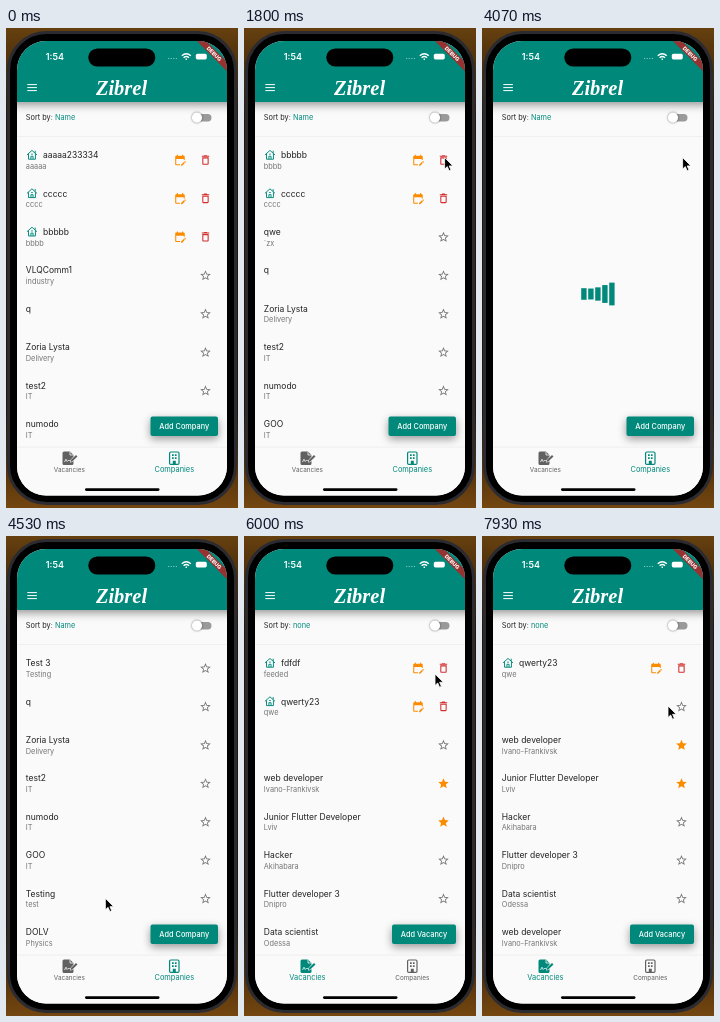
Animation of 232 by 480 pixels, one loop 8000 ms. Source, as an HTML page:

```html
<!DOCTYPE html>
<html lang="en">
<head>
<meta charset="utf-8">
<style>
html, body { margin: 0; width: 232px; height: 480px; overflow: hidden; background: #2b1a08 }
svg { display: block; font: 8.5px Inter, sans-serif }
.small { font-size: 7.35px }
.sub { font-size: 7.35px; fill: #757575 }
.teal { fill: #00897b }
.mid { text-anchor: middle }
.shadow { filter: drop-shadow(0 3px 4px #0006) }
.tab { color: #616161; font-size: 6.4px }
.tab.on { color: #00897b; font-size: 7.45px }
</style>
</head>
<body>
<svg width="232" height="480" viewBox="0 0 232 480">
  <defs>
    <linearGradient id="wall" x2="0" y2="1">
      <stop stop-color="#66400f"/><stop offset=".2" stop-color="#241507"/>
      <stop offset=".8" stop-color="#241507"/><stop offset="1" stop-color="#744610"/>
    </linearGradient>
    <clipPath id="screen"><rect x="11" y="13" width="210" height="454.5" rx="29"/></clipPath>
    <g id="home" fill="none" stroke="currentColor" stroke-width="1.8">
      <path d="M2.5 12.5 12 4l9.5 8.5M5.500 10.500V20.500h13V10.500M18 9V4.500M10 20.500V15h4v5.500M10.500 11h3"/>
    </g>
    <path id="edit" fill="currentColor" d="M12 22H5c-1.1 0-2-.9-2-2V6c0-1.1.9-2 2-2h1V2h2v2h8V2h2v2h1c1.1 0 2 .9 2 2v6h-2v-2H5v10h7zM22.1 17l.7-.7c.4-.4.4-1 0-1.4l-.7-.7c-.4-.4-1-.4-1.4 0l-.7.7zM21.4 17.7 16.1 23H14v-2.1l5.3-5.3z"/>
    <path id="trash" fill="currentColor" fill-rule="evenodd" d="M6 19c0 1.1.9 2 2 2h8c1.1 0 2-.9 2-2V7H6zM8 9h8v10H8zM15.5 4l-1-1h-5l-1 1H5v2h14V4z"/>
    <path id="star" fill="currentColor" d="M12 17.3 18.2 21l-1.7-7L22 9.2l-7.2-.6L12 2 9.2 8.6 2 9.2 7.5 14l-1.7 7z"/>
    <path id="hollow" fill="currentColor" fill-rule="evenodd" d="M12 17.3 18.2 21l-1.7-7L22 9.2l-7.2-.6L12 2 9.2 8.6 2 9.2 7.5 14l-1.7 7zM12 15.4l-3.8 2.3 1-4.3-3.3-2.9 4.4-.4L12 6.1l1.7 4 4.4.4-3.3 2.9 1 4.3z"/>
  </defs>

  <rect width="232" height="480" fill="url(#wall)"/>
  <rect x="2.5" y="4.5" width="227" height="471" rx="38" stroke="#2b2b30" stroke-width="3"/>
  <g clip-path="url(#screen)">
    <rect width="232" height="480" fill="#fafafa"/>
    <path d="M11 108.5h210" stroke="#f0f0f0"/>

    <g id="list"></g>
    <g id="loader" class="teal"></g>

    <g class="shadow"><rect id="fab" class="teal" y="388.4" height="19.6" rx="2"/></g>
    <text id="fabText" class="small mid" y="401" fill="#fff" font-weight="500"></text>

    <rect y="419" width="232" height="61" fill="#fafafa"/>
    <path d="M11 419h210" stroke="#eee"/>
    <g id="vacancies" class="tab" fill="currentColor">
      <path d="M58 423.5h6l3.5 3.5v1.5l-3.5 4v2l2.5-.4 1-1v2.4q0 1.5-1.5 1.5h-8q-1.5 0-1.5-1.5V425q0-1.5 1.5-1.5zM70 427l1.5 1.5-5.2 5-1.8.4.4-1.8z"/>
      <path d="M58.5 434l1.5-2.8 1.2 2.3 1-1h1.6M64 423.5v3.5h3.5" fill="none" stroke="#fafafa" stroke-width=".8"/>
      <text class="mid" x="63.4" y="443.8">Vacancies</text>
    </g>
    <g id="companies" class="tab" fill="currentColor">
      <rect x="163.6" y="424" width="9.4" height="12.4" rx="1.2" fill="none" stroke="currentColor" stroke-width="1.2"/>
      <path d="M166 426.3h1.7v1.7h-1.7zm2.9 0h1.7v1.7h-1.7zM166 429.3h1.7v1.7h-1.7zm2.9 0h1.7v1.7h-1.7zM166.8 436.5v-3.7h3v3.7z"/>
      <text class="mid" x="168.3" y="443.8">Companies</text>
    </g>
    <rect x="79" y="460.3" width="74.5" height="2.6" rx="1.3"/>

    <rect class="teal shadow" width="232" height="74"/>
    <text class="small" x="19.8" y="92.2" fill="#222">Sort by: <tspan id="sort" class="teal"></tspan></text>
    <rect x="187.5" y="86" width="18" height="7.4" rx="3.7" fill="#9a9a9a"/>
    <circle cx="191" cy="89.6" r="5.1" fill="#fff" style="filter:drop-shadow(0 .6px .8px #0008)"/>

    <text x="39.8" y="31.8" font-size="9" font-weight="600" fill="#fff">1:54</text>
    <rect x="82.3" y="20.4" width="67" height="18.2" rx="9.1"/>
    <path d="M162 30.5h9" stroke="#7fc4bd" stroke-width="1.2" stroke-dasharray="1.2 1.4"/>
    <g fill="none" stroke="#fff" stroke-width="1.4">
      <path d="M175.8 27.7q4.5-4 9 0M177.6 29.7q2.7-2.4 5.4 0M179.6 31.2h1.400"/>
      <path d="M21.3 56.6h9.6m-9.6 3h9.6m-9.6 3h9.6" stroke-width="1"/>
    </g>
    <rect x="189.8" y="25.8" width="11" height="5.6" rx="1.6" fill="#fff"/>
    <text class="mid" x="115.5" y="67" fill="#fff" style="font:italic bold 20.5px 'Liberation Serif',serif">Zibrel</text>
    <g transform="translate(208.2 25.8) rotate(45)">
      <rect x="-22" y="-3.2" width="44" height="6.4" fill="#983230"/>
      <text class="mid" y="1.9" font-size="5.3" font-weight="800" fill="#fff">DEBUG</text>
    </g>
  </g>
  <path id="cursor" d="M0 0v11.5l2.7-2.5 1.8 4.2 1.9-.8-1.8-4.1h3.7z" stroke="#fff" stroke-width=".8"/>
</svg>

<script>
const $ = id => document.getElementById(id);
const LOOP = 8000, ROW = 38.4;

// Entries: title, subtitle, kind ("own", "fav" or plain)
const b = ["bbbbb", "bbbb", "own"], c = ["ccccc", "cccc", "own"], qwe = ["qwe", "`zx"];
const firms = [["q", ""], ["Zoria Lysta", "Delivery"], ["test2", "IT"], ["numodo", "IT"],
  ["GOO", "IT"], ["Testing", "test"], ["DOLV", "Physics"]];
const web = ["web developer", "Ivano-Frankivsk", "fav"];
const jobs = [["fdfdf", "feeded", "own"], ["qwerty23", "qwe", "own"], ["", ""], web,
  ["Junior Flutter Developer", "Lviv", "fav"], ["Hacker", "Akihabara"],
  ["Flutter developer 3", "Dnipro"], ["Data scientist", "Odessa"], web];

// Start time and list; null shows the loader
const scenes = [
  [0, [["aaaaa233334", "aaaaa", "own"], c, b, ["VLQComm1", "industry"], ...firms]],
  [850, null], [1530, [b, c, qwe, ...firms]],
  [2670, null], [3000, [c, qwe, ...firms]],
  [3900, null], [4300, [["Test 3", "Testing"], ...firms]],
  [4870, null], [5530, jobs],
  [6520, null], [7200, jobs.slice(1)]
];
const VACANCIES_FROM = 4870;

// Time, x, y of the pointer tip
const path = [[0, 240, 360], [270, 236, 350], [400, 214, 220], [500, 203, 150], [600, 200.6, 129.6],
  [4300, 200.6, 129.6], [4400, 165, 212], [4530, 99.6, 362], [4670, 66, 408], [4800, 48, 428],
  [5600, 48, 428], [5720, 86, 350], [5880, 165, 192], [6000, 191, 138], [6400, 198, 131],
  [7790, 198, 131], [7920, 186, 170], [LOOP, 186, 170]];

const icon = (name, x, y, color) =>
  `<use href="#${name}" color="${color}" transform="translate(${x - 6.4} ${y - 6.4}) scale(.532)"/>`;

function row([title, sub, kind], i) {
  const own = kind === "own";
  const icons = own
    ? icon("home", 26, 126.7, "#00897b") + icon("edit", 174, 132, "#fb8c00") + icon("trash", 199.5, 132, "#d32f2f")
    : kind ? icon("star", 199.5, 132.3, "#fb8c00") : icon("hollow", 199.5, 132.3, "#757575");
  return `<g transform="translate(0 ${i * ROW})">${icons}
    <text x="${own ? 37 : 19.8}" y="130.3" fill="#222">${title}</text>
    <text class="sub" x="19.8" y="140.8">${sub}</text></g>`;
}

function showScene([start, list]) {
  const vacancies = start >= VACANCIES_FROM;
  $("list").innerHTML = list ? list.slice(0, 8).map(row).join("") : "";
  $("sort").textContent = vacancies ? "none" : "Name";
  $("vacancies").classList.toggle("on", vacancies);
  $("companies").classList.toggle("on", !vacancies);
  const left = vacancies ? 148 : 144.5;
  $("fab").setAttribute("x", left);
  $("fab").setAttribute("width", 212 - left);
  $("fabText").setAttribute("x", (left + 212) / 2);
  $("fabText").textContent = vacancies ? "Add Vacancy" : "Add Company";
}

function bars(age) {
  return [0, 1, 2, 3, 4].map(k => {
    const phase = age / 1000 + .4 - .1 * k;
    const h = 27 * (.7 + .3 * Math.cos(2 * Math.PI * phase));
    return `<rect x="${99.2 + 7 * k}" y="${266 - h / 2}" width="5.4" height="${h}"/>`;
  }).join("");
}

function pointer(t) {
  const i = path.findIndex(p => p[0] > t);
  const [t0, x0, y0] = path[i - 1], [t1, x1, y1] = path[i];
  const f = (t - t0) / (t1 - t0);
  return `translate(${x0 + (x1 - x0) * f} ${y0 + (y1 - y0) * f})`;
}

let current;
function draw() {
  const t = performance.now() % LOOP;
  const scene = scenes.findLast(s => s[0] <= t);
  if (scene !== current) showScene(current = scene);
  $("loader").innerHTML = scene[1] ? "" : bars(t - scene[0]);
  $("cursor").setAttribute("transform", pointer(t));
  requestAnimationFrame(draw);
}
draw();
</script>
</body>
</html>
```
